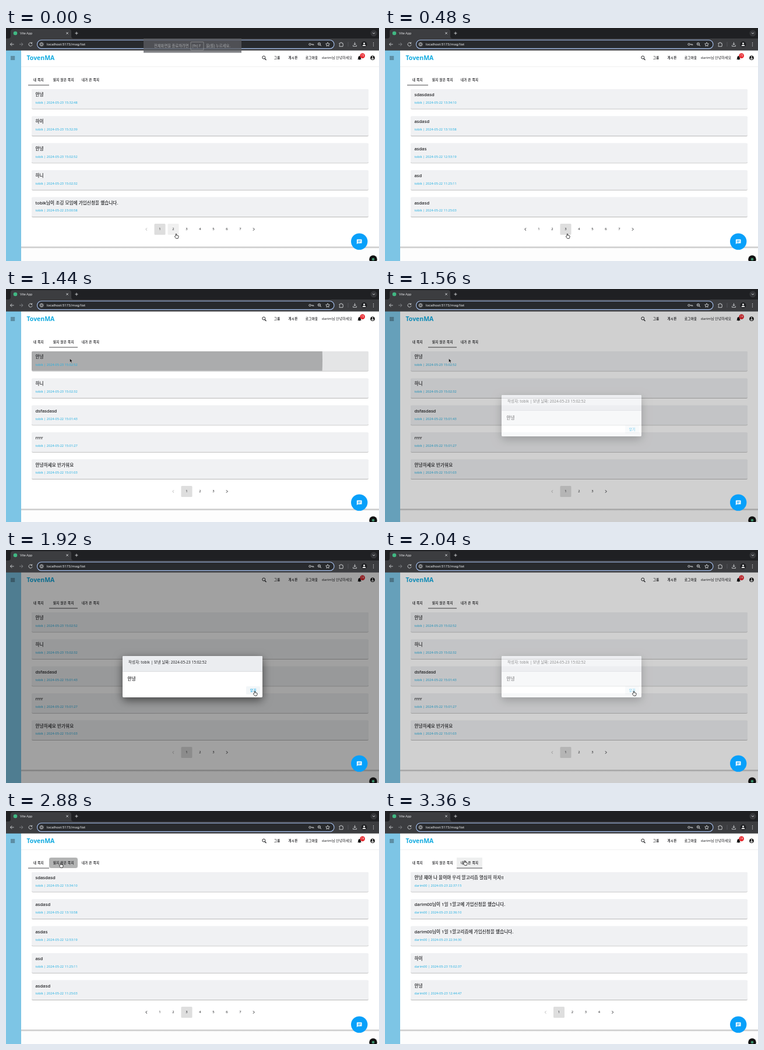
These frames come from a looping animation (640 by 400 pixels, 3.84 s). An HTML page:

```html
<!DOCTYPE html>
<html lang="ko">
<head>
<meta charset="utf-8">
<title>Message list</title>
<style>
html, body { margin: 0; width: 100%; height: 100%; overflow: hidden; background: #fff; }
svg { display: block; width: 640px; height: 400px; }
text { font-family: "Noto Sans", "Noto Sans CJK KR", "Noto Sans CJK", sans-serif; white-space: pre; }
.ui { font-family: Roboto, "Open Sans", sans-serif; }
.line { fill: none; stroke: #d4d6d9; stroke-width: .9; }
</style>
</head>
<body>
<svg id="stage" viewBox="0 0 640 400">
  <defs>
    <filter id="soft" x="-20%" y="-50%" width="140%" height="220%"><feDropShadow dx="0" dy="5" stdDeviation="8" flood-opacity=".55"/></filter>
    <filter id="low" x="-2%" y="-10%" width="104%" height="140%"><feDropShadow dx="0" dy=".7" stdDeviation=".5" flood-opacity=".4"/></filter>
    <linearGradient id="edge" x2="0" y2="1"><stop stop-color="#aaa"/><stop offset="1" stop-color="#fdfdfd"/></linearGradient>
    <clipPath id="pressed"><rect x="44" y="107" width="578" height="33.5" rx="2"/></clipPath>
  </defs>
  <g id="page"></g>

  <!-- browser frame -->
  <rect width="640" height="38.6" fill="#3c3d40"/>
  <rect width="640" height="18" fill="#1f2023"/>
  <path d="M4 18q4 0 4-4V6q0-4 4-4h96q4 0 4 4v8q0 4 4 4z" fill="#3c3d40"/>
  <circle cx="16" cy="9" r="3.3" fill="#41b883"/>
  <text class="ui" x="24" y="11" font-size="5.6" fill="#e3e4e6">Vite App</text>
  <path class="line" d="M103.4 7.2l3.4 3.4m0-3.4l-3.4 3.4M118.5 9h5m-2.5-2.5v5"/>
  <circle cx="631" cy="9" r="5.5" fill="#35363a"/>
  <path class="line" d="M629 8l2 2 2-2"/>
  <path class="line" d="M13.5 28h-6m2.7-2.8L7.4 28l2.8 2.8M44.2 26a3 3 0 1 0 .8 2.5m-.3-4v2h-2"/>
  <path class="line" d="M23 28h6m-2.7-2.8l2.8 2.8-2.8 2.8" style="stroke:#85878b"/>
  <rect x="53.5" y="20.8" width="509.5" height="14.6" rx="7.3" fill="#282a2d" stroke="#a9c4f3" stroke-width="1.1"/>
  <circle cx="61" cy="28" r="4.8" fill="#3c3d40"/>
  <circle class="line" cx="61" cy="28" r="2.6"/>
  <path class="line" d="M61 27.6v1.7m0-3v.6"/>
  <text class="ui" x="70" y="30.3" font-size="6.2" fill="#eceef0">localhost:5173/msg/list</text>
  <circle class="line" cx="521.5" cy="28" r="1.7"/>
  <path class="line" d="M523.3 28h4.5v1.8m-2-1.8v1.6M539 29l2 2M536.2 27.4h2.4M552 24.7l1 2.2 2.4.3-1.8 1.6.5 2.4-2.1-1.2-2.1 1.2.5-2.4-1.8-1.6 2.4-.3z"/>
  <circle class="line" cx="537.4" cy="27.4" r="2.2"/>
  <path class="line" d="M572 26h1.8a1.2 1.2 0 0 1 2.4 0h1.8v2a1.2 1.2 0 0 1 0 2v1.7h-6v-1.7a1.1 1.1 0 0 0 0-2z"/>
  <path class="line" d="M598.5 24.5v4.5m-2-2l2 2 2-2m-5 2.5v1.8h6v-1.8"/>
  <path d="M587 24v8" stroke="#66686c" stroke-width=".6"/>
  <circle cx="614.5" cy="28" r="5" fill="#202124"/>
  <path d="M611.7 31a2.8 2.2 0 0 1 5.6 0z" fill="#eee"/><circle cx="614.5" cy="26.5" r="1.5" fill="#eee"/>
  <path d="M630.5 25.3v.1m0 2.6v.1m0 2.6v.1" stroke="#dcdde0" stroke-width="1.3" stroke-linecap="round"/>
  <g id="top"></g>
</svg>

<script>
const STEP = 120, LOOP = 3840, LAST = 28;
const USER = 'tobik', ME = 'darim', MY_ID = 'darim00';
const BLUE = '#24b0e2', INK = '#202124';
const tabs = [[38, 36, '내 쪽지'], [74, 49, '읽지 않은 쪽지'], [123, 44, '내가 쓴 쪽지']];
const pageCount = [7, 3, 4];

// each entry: title|day time
const lists = {
  '0-1': ['안녕|23 15:32:48', '하이|23 15:32:39', '안녕|23 15:02:52', '하니|23 15:02:32', USER + '님이 조깅 모임에 가입신청을 했습니다.|22 23:00:58'],
  '0-2': ['dsfasdasd|22 15:01:43', 'rrrr|22 15:01:27', '안녕하세요 반가워요|22 15:01:03', 'asdasd|22 13:41:20', 'asdas|22 13:36:02'],
  '0-3': ['sdasdasd|22 13:34:10', 'asdasd|22 13:10:58', 'asdas|22 12:53:19', 'asd|22 11:25:11', 'asdasd|22 11:25:03'],
  '1-1': ['안녕|23 15:02:52', '하니|23 15:02:32', 'dsfasdasd|22 15:01:43', 'rrrr|22 15:01:27', '안녕하세요 반가워요|22 15:01:03'],
  '2-1': ['안녕 채야 나 율이야 우리 알고리즘 열심히 하자!!|23 22:37:15', MY_ID + '님이 1일 1알고에 가입신청을 했습니다.|23 22:36:10', MY_ID + '님이 1일 1알고리즘에 가입신청을 했습니다.|23 22:34:30', '하이|23 15:02:37', '안녕|23 12:44:47']
};

// pointer path: step, x, y
const path = [[0, 293, 357], [1, 293, 357], [2, 314, 357], [4, 314, 357], [7, 92, 97], [8, 92, 97], [11, 111, 123], [14, 111, 123],
  [16, 428, 246], [17, 428, 246], [18, 177, 150], [20, 58, 93], [22, 58, 93], [24, 95, 93], [25, 95, 93], [27, 138, 89], [28, 138, 89]];

const rect = (x, y, w, h, fill, more = '') => `<rect x="${x}" y="${y}" width="${w}" height="${h}" fill="${fill}" ${more}/>`;
const text = (x, mid, size, str, fill = INK, more = '') =>
  `<text x="${x}" y="${mid + size * .36}" font-size="${size}" fill="${fill}" ${more}>${str}</text>`;
// a hairline outline gives the medium weight
const medium = (x, mid, size, str, spacing, fill = INK) =>
  text(x, mid, size, str, fill, `letter-spacing="${spacing}" stroke="${fill}" stroke-width=".16"`);
const label = (x, mid, str, fill) => medium(x, mid, 5.3, str, .47, fill);
const icon = (x, y, scale, fill, d) =>
  `<path transform="translate(${x} ${y}) scale(${scale}) translate(-12 -12)" fill="${fill}" fill-rule="evenodd" d="${d}"/>`;
const stroke = (d, color, width) => `<path d="${d}" fill="none" stroke="${color}" stroke-width="${width}"/>`;

function pointerAt(k) {
  const i = Math.max(1, path.findIndex(p => p[0] >= k));
  const [k0, x0, y0] = path[i - 1], [k1, x1, y1] = path[i];
  const f = (k - k0) / (k1 - k0);
  return [x0 + (x1 - x0) * f, y0 + (y1 - y0) * f];
}

function stateAt(k) {
  const [x, y] = pointerAt(k);
  const tab = k < 7 ? 0 : k < 21 ? 1 : k < 25 ? 0 : k < 27 ? 1 : 2;
  return {
    k, x, y, tab,
    page: tab ? 1 : k < 1 ? 1 : k < 3 ? 2 : 3,
    shift: k > 9 && k < 18 ? 2 : 0,
    dialog: k < 13 || k > 17 ? 0 : k == 13 || k == 17 ? .5 : 1,
    pressedTab: { 7: 1, 21: 0, 24: 1, 27: 2 }[k],
    arrow: k == 5 || k == 6 || (k > 8 && k < 16),
    over: (l, t, w, h) => x - 1 >= l && x - 1 < l + w && y - 3 >= t && y - 3 < t + h
  };
}

function drawTabs(s) {
  return tabs.map(([x, w, name], i) =>
    (s.over(x, 80, w, 18) && !s.shift ? rect(x, 80, w, 18, '#eeefef') : '') +
    (s.pressedTab === i ? rect(x, 80, w, 18, '#b2b3b3', 'rx="4"') : '') +
    label(x + (i ? 7 : 9), 88.7, name) +
    (s.tab == i ? rect(x, 97.6, w, .9, '#303134') : '')).join('');
}

function drawCards(s) {
  return lists[s.tab + '-' + s.page].map((item, i) => {
    const [title, date] = item.split('|');
    let y = 105 + i * 46.4;
    if (!s.shift && s.over(44, y - 6, 578, 40)) y -= 2;
    const ripple = s.k == 12 && i == 0;
    return rect(44, y, 578, 33.5, ripple ? '#e4e5e6' : '#f0f1f3', 'rx="2" filter="url(#low)"') +
      (ripple ? '<g transform="translate(0 -2)"><circle cx="111" cy="123" r="432" fill="#abacad" clip-path="url(#pressed)"/></g>' : '') +
      medium(50.5, y + 9.2, 7.6, title, .09) +
      text(50.5, y + 22.9, 5.5, `${s.tab == 2 ? MY_ID : USER} | 2024-05-${date}`, BLUE, 'letter-spacing=".05"');
  }).join('');
}

function drawPager(s) {
  const n = pageCount[s.tab], x0 = 333 - (n - 1) * 11.5;
  let out = stroke(`M${x0 - 22} 343.3l-2.2 2.2 2.2 2.2`, s.page == 1 ? '#b5b5b5' : INK, 1) +
    stroke(`M${x0 + n * 23 - 1} 343.3l2.2 2.2-2.2 2.2`, INK, 1);
  for (let i = 1; i <= n; i++) {
    const x = x0 + (i - 1) * 23, box = [x - 9.5, 336, 19, 19];
    const fill = s.page == i ? '#dedede' : s.over(...box) ? '#f0f0f0' : '';
    if (fill) out += rect(...box, fill, 'rx="1.5"');
    out += text(x, 345.4, 5.8, i, INK, 'text-anchor="middle"');
  }
  return out;
}

function drawHeader(s) {
  return rect(26, 38, 614, 28.5, '#fff') + (s.shift ? '' : rect(26, 66.2, 614, .8, '#ececec')) +
    text(35.5, 51.3, 10.5, 'TovenMA', '#12abe0', 'font-weight="700"') +
    stroke('M444 52.5l2.5 2.5', INK, 1.2) + `<circle cx="442.3" cy="50.5" r="2.5" fill="none" stroke="${INK}" stroke-width="1"/>` +
    label(460, 51, '그룹') + label(484.5, 51, '게시판') + label(514, 51, '로그아웃') +
    text(542, 51, 6.08, ME + '님 안녕하세요') +
    icon(606.5, 51.3, .38, '#111', 'M12 22a2 2 0 0 0 2-2h-4a2 2 0 0 0 2 2zm6-6v-5c0-3-1.6-5.6-4.5-6.3V4a1.5 1.5 0 0 0-3 0v.7C7.6 5.4 6 7.9 6 11v5l-2 2v1h16v-1z') +
    '<circle cx="611.7" cy="47.6" r="4.3" fill="#e8292f"/>' +
    text(611.7, 47.5, 4.4, s.k < 13 ? 15 : 14, '#fff', 'text-anchor="middle"') +
    icon(629, 51.3, .38, '#111', 'M12 2a10 10 0 1 0 0 20a10 10 0 0 0 0-20zm0 3a3 3 0 1 1 0 6a3 3 0 0 1 0-6zm0 14.2a7.2 7.2 0 0 1-6-3.2c0-2 4-3.1 6-3.1s6 1.1 6 3.1a7.2 7.2 0 0 1-6 3.2z');
}

function drawDialog(s) {
  return `<g opacity="${s.dialog}">` + rect(0, 38, 640, 362, '#000', 'opacity=".37"') +
    rect(200, 182, 240, 71, '#fff', 'rx="2" filter="url(#soft)"') +
    rect(200, 182, 240, 27, '#ebedf0', 'rx="2"') + rect(200, 208.3, 240, .7, '#d3d5d7') +
    text(210, 193, 6.4, `작성자: ${USER} | 보낸 날짜: 2024-05-23 15:02:52`, INK, 'letter-spacing=".06"') +
    medium(208.5, 221.5, 7.6, '안녕', .09) +
    rect(412, 234, 24, 14, '#f2f6f8', 'rx="1.5"') + label(419, 240.6, '닫기', '#18a8e8') + '</g>';
}

function drawPage(s) {
  return rect(0, 38, 640, 362, '#fdfdfd') +
    `<g transform="translate(0 ${s.shift})">` + rect(26, 375.2, 614, 3.6, 'url(#edge)') + rect(26, 60, 614, 315.4, '#fff') +
    drawTabs(s) + drawCards(s) + drawPager(s) + '</g>' + drawHeader(s) +
    rect(0, 38, 26, 362, '#7dc5e5') + stroke('M8 49h7.2M8 51.5h7.2M8 54h7.2', '#263238', .9) +
    (s.dialog ? drawDialog(s) : '') +
    '<circle cx="606.2" cy="366.6" r="14.2" fill="#08a0fa"/>' +
    icon(606.2, 367, .43, '#fff', 'M20 2H4a2 2 0 0 0-2 2v18l4-4h14a2 2 0 0 0 2-2V4a2 2 0 0 0-2-2zM6 9h12v2H6zm8 5H6v-2h8zm4-6H6V6h12z') +
    '<circle cx="630" cy="397" r="6.8" fill="#121212"/><circle cx="630" cy="397" r="2.3" fill="#3a8f6a"/>';
}

function drawBanner(alpha) {
  const ink = '#a9abae';
  return `<g opacity="${alpha}">` + rect(236, 18, 168, 24.5, '#5b5d62', 'opacity=".76"') +
    text(254, 31, 6.3, '전체화면을 종료하려면', ink) +
    rect(317, 24, 22, 14, 'none', `rx="1" stroke="${ink}" stroke-width=".6"`) + text(319.5, 31, 6.3, '(fn) F', ink) +
    text(343, 31, 6.3, '을(를) 누르세요.', ink) + '</g>';
}

function drawPointer(s) {
  const [d, fill, line, width] = s.arrow
    ? ['M-1.5-3.5v6.3l1.5-1.3 1.1 2.5 1.1-.5-1.1-2.4h2z', '#111', '#ddd', .4]
    : ['M-1.8 0v-3.2a.8.8 0 0 1 1.5 0v2.1l2.4.5q1.2.3 1.1 1.5l-.5 1.9-.6 1.5h-3.4l-2.2-3q-.2-1.1.7-.9z', '#fff', '#111', .8];
  return `<path transform="translate(${s.x} ${s.y})" d="${d}" fill="${fill}" stroke="${line}" stroke-width="${width}" stroke-linejoin="round"/>`;
}

const page = document.getElementById('page'), overlay = document.getElementById('top');
let shown = -1;
function tick(now) {
  const k = Math.min(LAST, Math.floor(now % LOOP / STEP));
  if (k != shown) {
    shown = k;
    const s = stateAt(k);
    page.innerHTML = drawPage(s);
    overlay.innerHTML = (k < 3 ? drawBanner(1 - k / 3) : '') + drawPointer(s);
  }
  requestAnimationFrame(tick);
}
tick(0);
</script>
</body>
</html>
```
